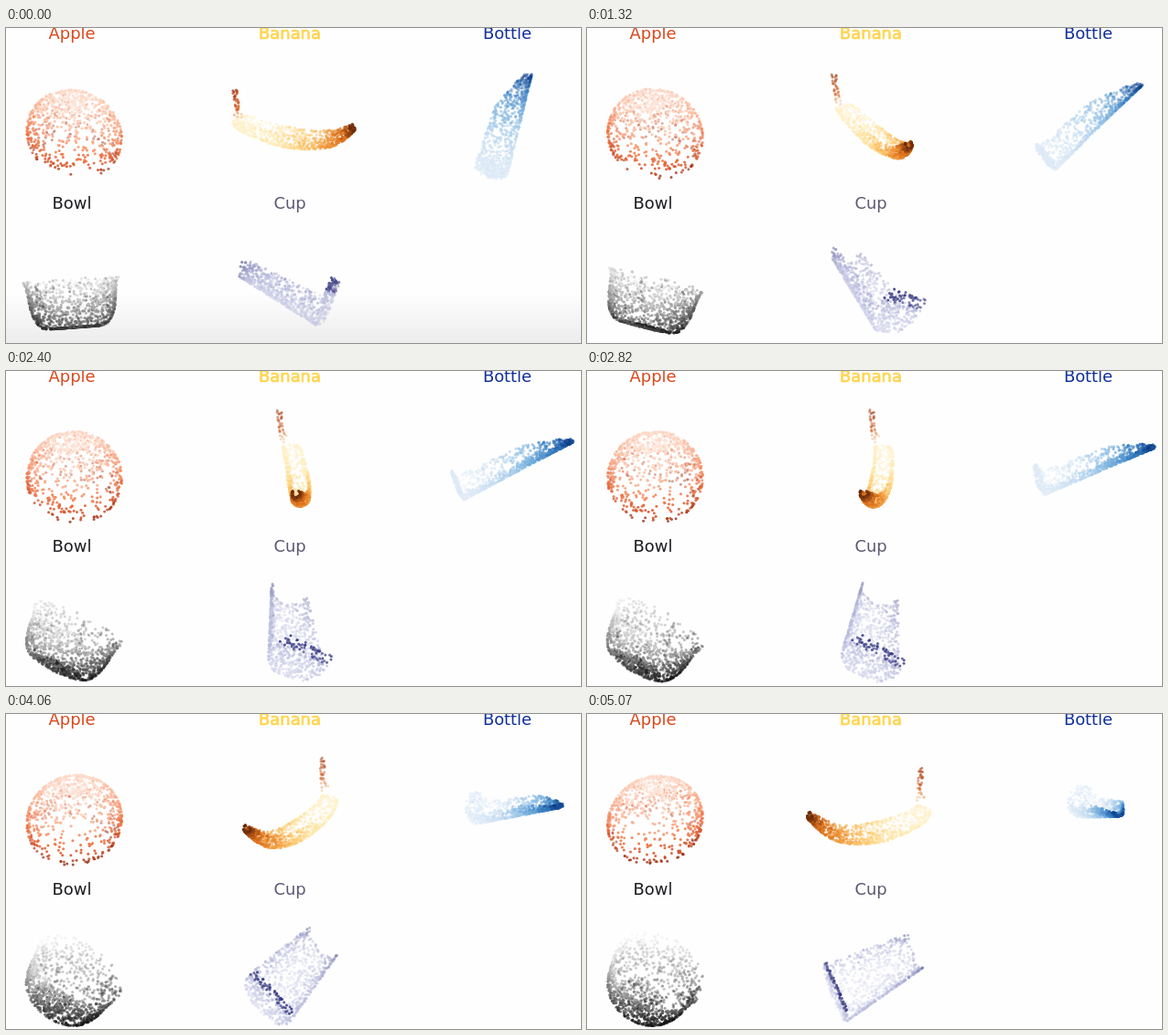
Recreate the animation shown at these times as an HTML page with a canvas. Size 628 px wide and 345 px high, loop 5150 ms.

```html
<!DOCTYPE html>
<html lang="en">
<head>
<meta charset="utf-8">
<title>Rotating point clouds</title>
<style>
  html, body { margin: 0; width: 100%; height: 100%; overflow: hidden; background: #fefefe; }
  canvas, svg { position: absolute; left: 0; top: 0; width: 628px; height: 345px; display: block; }
  text { font: 17.9px "DejaVu Sans", sans-serif; text-anchor: middle; }
</style>
</head>
<body>
<canvas id="cloud" width="628" height="345"></canvas>
<svg viewBox="0 0 628 345">
  <defs>
    <linearGradient id="shade" x1="0" y1="0" x2="0" y2="1">
      <stop offset="0" stop-color="#000" stop-opacity="0"/>
      <stop offset="1" stop-color="#000" stop-opacity=".07"/>
    </linearGradient>
  </defs>
  <rect id="fade" y="290" width="628" height="55" fill="url(#shade)"/>
  <text x="72" y="12" fill="#d9481c">Apple</text>
  <text x="310" y="12" fill="#ffd44f" stroke="#ffd44f" stroke-width=".7">Banana</text>
  <text x="547.5" y="12" fill="#12309a">Bottle</text>
  <text x="72" y="198" fill="#1c1c20">Bowl</text>
  <text x="310" y="198" fill="#5d5872">Cup</text>
</svg>
<script>
const LOOP = 5150, STEPS = 62, STEP = LOOP / STEPS;
const ELEV = Math.PI / 6, COS = Math.cos(ELEV), SIN = Math.sin(ELEV);
const ctx = document.getElementById('cloud').getContext('2d');
const fade = document.getElementById('fade');

let seed = 7;
function rnd() {
  seed = (seed + 0x6D2B79F5) | 0;
  let t = Math.imul(seed ^ (seed >>> 15), 1 | seed);
  t = (t + Math.imul(t ^ (t >>> 7), 61 | t)) ^ t;
  return ((t ^ (t >>> 14)) >>> 0) / 4294967296;
}
const range = (a, b) => a + (b - a) * rnd();
const mix = (a, b, t) => a + (b - a) * t;
const mix3 = (a, b, t) => a.map((v, i) => mix(v, b[i], t));
const clamp = v => Math.max(0, Math.min(1, v));
const cross = (a, b) => [a[1] * b[2] - a[2] * b[1], a[2] * b[0] - a[0] * b[2], a[0] * b[1] - a[1] * b[0]];
const unit = a => { const n = Math.hypot(...a); return a.map(v => v / n); };
// point given by ground position and vertical offset in screen pixels
const at = (x, y, down) => [x, y, -down / COS];
const onRing = (c, e1, e2, r, ang) =>
  c.map((v, i) => v + r * (Math.cos(ang) * e1[i] + Math.sin(ang) * e2[i]));

function ramp(stops) {
  const rgb = stops.split(' ').map(h => [0, 2, 4].map(i => parseInt(h.substr(i, 2), 16)));
  return v => {
    const u = clamp(v) * (rgb.length - 1), i = Math.min(rgb.length - 2, Math.floor(u));
    return 'rgb(' + mix3(rgb[i], rgb[i + 1], u - i).map(Math.round) + ')';
  };
}

const clouds = [];
function cloud(cx, cy, size, stops, low, make) {
  const color = ramp(stops), pts = [];
  make((p, v) => pts.push({ p, color: color(v), x: 0, y: 0, d: 0 }));
  clouds.push({ cx, cy, size, low, pts });
}

cloud(74.5, 117, 1.5, 'fde6da fccbb4 f9a582 ee7444 d04e26 8e2810', .4, add => {
  for (let i = 0; i < 820; i++) {
    const z = 1 - 1.7 * Math.pow(rnd(), 1.35), ang = range(0, 2 * Math.PI);
    const polar = Math.acos(z), r = 52 * Math.pow(Math.sin(polar), 1.1);
    const x = r * Math.cos(ang), y = r * Math.sin(ang);
    if (z < range(-.68, -.3) - .15 * x / 52) continue;
    const dent = 1 - .2 * Math.exp(-Math.pow(polar / .4, 2));
    add([x, y, 49 * z * dent + .1 * y], (1 - z) / 1.6 + range(-.05, .05));
  }
});

const spine = [
  at(-7.7, 61, -36), at(-5, 58, -13), at(6, 56, 5),
  at(10, 8, 15), at(9, -40, 9), at(2, -72, -12)
];
const girth = [2.5, 2, 10, 12, 10, 4];
function along(u) {
  const i = Math.min(4, Math.floor(u)), t = u - i;
  const p1 = spine[i], p2 = spine[i + 1];
  const p0 = spine[Math.max(0, i - 1)], p3 = spine[Math.min(5, i + 2)];
  return p1.map((v, k) => v + .5 * t * (p2[k] - p0[k] + t * (2 * p0[k] - 5 * v + 4 * p2[k] - p3[k]
    + t * (3 * (v - p2[k]) + p3[k] - p0[k]))));
}
const yellows = 'a8401a bf5220 dd6a2c ffeec6 fff1cc feebb4 fee09a fcc468 f09a40 dc701c 6a2c0c';
cloud(310, 110, 1.5, yellows, .4, add => {
  for (let i = 0; i < 820; i++) {
    const u = i < 34 ? range(0, 1.4) : range(1.75, 5);
    const c = along(u), a = along(Math.max(0, u - .03)), b = along(Math.min(5, u + .03));
    const t = unit([0, b[1] - a[1], b[2] - a[2]]);
    const k = Math.min(4, Math.floor(u)), r = mix(girth[k], girth[k + 1], u - k);
    const ang = -Math.PI / 2 + range(-1, 1) * (u < 1.5 ? 3.1 : 2.3);
    add(onRing(c, [1, 0, 0], [0, t[2], -t[1]], r, ang), u / 5 + range(-.04, .04));
  }
});

cloud(556, 102, 1.5, 'e4edf8 d8e7f5 c2daf0 9cc6e8 68a6d8 3478bc 0c3a84', .38, add => {
  const e1 = [0, 1, 0], e2 = [-.389, 0, .921];
  const center = s => [mix(-63, 63, s), 6, mix(-26.6, 26.6, s)];
  for (let i = 0; i < 760; i++) {
    const s = rnd();
    const r = s < .6 ? mix(19, 16, s / .6) : mix(16, 4, (s - .6) / .4);
    // the bulge grows to one side only, so the far edge stays straight
    const shift = .8 * (r - mix(19, 4, s));
    const c = center(s).map((v, k) => v + shift * (e1[k] + e2[k]));
    add(onRing(c, e1, e2, r, -Math.PI / 2 + range(-1.5, 1.5)), s + range(-.06, .06));
  }
  for (let i = 0; i < 150; i++)
    add(onRing(center(0), e1, e2, 17 * Math.sqrt(rnd()), range(0, 2 * Math.PI)), range(0, .15));
});

cloud(72, 291, 1.5, 'f2f2f2 d2d2d2 a0a0a0 686868 343434 101010', .25, add => {
  const n = unit([.44, .23, .87]), e1 = unit(cross(n, [0, 1, 0])), e2 = cross(n, e1);
  for (let i = 0; i < 1150; i++) {
    const floor = rnd() < .22, h = floor ? 1 : Math.pow(rnd(), .9);
    const wall = 30 + 18 * Math.sqrt(1 - Math.pow(h, 3)) + 5 * Math.exp(-7 * h);
    const r = floor ? 30 * Math.sqrt(rnd()) : wall;
    const c = n.map(v => v * (16 - 53 * h));
    const p = onRing(c, e1, e2, r, range(0, 2 * Math.PI));
    add(p, (36 - p[2]) / 76 + range(-.06, .06));
  }
});

cloud(309, 290, 1.5, 'e4e5f3 d4d6ec bcbedd 999bc6 6668a2 34367c', .35, add => {
  const base = at(10, -43, 2), lip = at(6, 51, -27);
  const m = unit([.55, -.17, .81]), t = unit([-.83, -.11, .54]);
  for (let i = 0; i < 640; i++) {
    const s = rnd(), k = range(-1, 1), ang = -Math.PI / 2 + 1.5 * k;
    const p = onRing(mix3(base, lip, s), t, m, mix(35, 22, s), ang);
    add(p, .1 + .3 * Math.abs(k) + .4 * Math.pow(s, 6) + range(-.08, .12));
  }
  for (let i = 0; i < 190; i++) {
    const r = Math.sqrt(rnd()), ang = range(0, 2 * Math.PI), h = r * Math.sin(ang);
    if (h > .62) continue;
    add(onRing(base, t, m, 34 * r, ang), h > .15 ? range(.8, 1) : .2 + .3 * (h + .6));
  }
});

function drawCloud({ cx, cy, size, low, pts }, turn) {
  const c = Math.cos(turn), s = Math.sin(turn);
  let near = Infinity, far = -Infinity;
  for (const q of pts) {
    const [x, y, z] = q.p, back = x * s + y * c;
    q.x = cx + x * c - y * s;
    q.y = cy - COS * z - SIN * back;
    q.d = COS * back - SIN * z;
    near = Math.min(near, q.d);
    far = Math.max(far, q.d);
  }
  pts.sort((a, b) => b.d - a.d);
  for (const q of pts) {
    ctx.globalAlpha = mix(low, .95, (far - q.d) / (far - near));
    ctx.fillStyle = q.color;
    ctx.beginPath();
    ctx.arc(q.x, q.y, size, 0, 2 * Math.PI);
    ctx.fill();
  }
}

let shown = -1;
function render(ms) {
  const step = Math.min(STEPS - 1, Math.floor((ms % LOOP + 15) / STEP));
  if (step === shown) return;
  shown = step;
  const sec = step * STEP / 1000;
  ctx.clearRect(0, 0, 628, 345);
  for (const c of clouds) drawCloud(c, (71 - 28 * sec) * Math.PI / 180);
  fade.setAttribute('opacity', clamp(1 - sec / .5));
}

const start = performance.now();
function tick() {
  render(performance.now() - start);
  requestAnimationFrame(tick);
}
tick();
</script>
</body>
</html>
```
